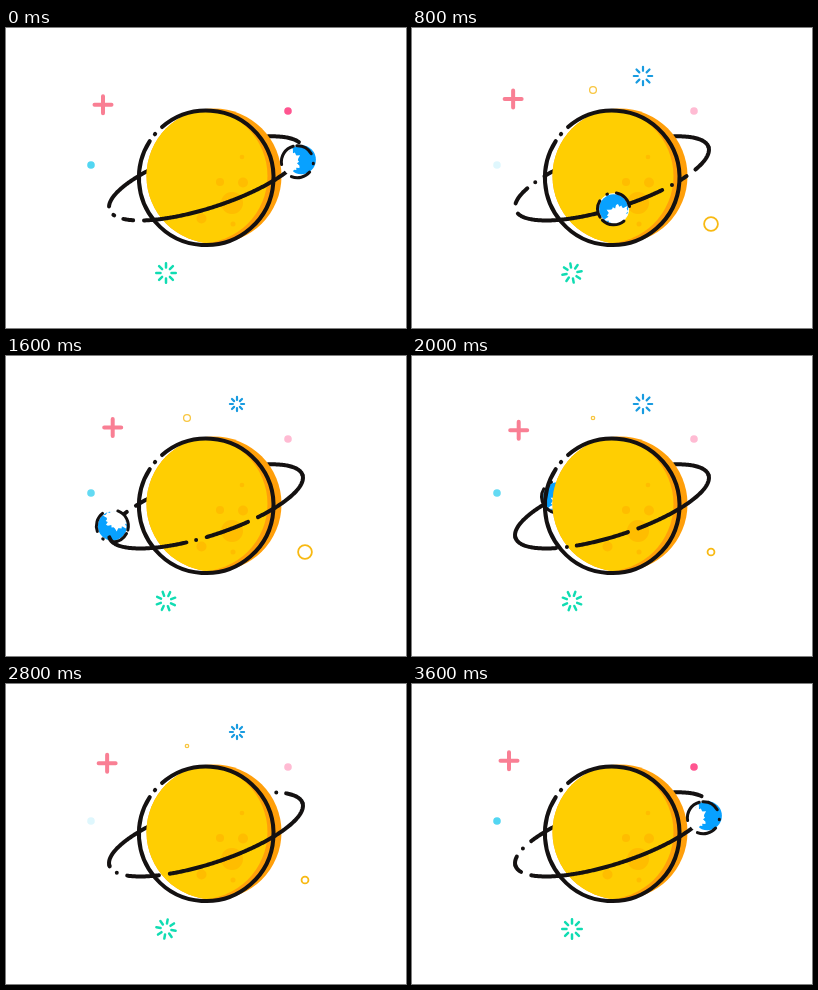
Recreate the animation shown at these times as an HTML page with a canvas. Size 400 px wide and 300 px high, loop 3700 ms.

```html
<!DOCTYPE html>
<html lang="en">
<head>
<meta charset="utf-8">
<title>Planet and moon</title>
<style>
html, body { margin: 0; width: 100%; height: 100%; overflow: hidden; background: #fff; }
canvas { display: block; }
</style>
</head>
<body>
<canvas id="stage" width="400" height="300"></canvas>
<script>
const c = document.getElementById('stage').getContext('2d');
const INK = '#141111', BLUE = '#08a1ff', TAU = Math.PI * 2, DEG = Math.PI / 180;
const LOOP = 3700, STEP = 100, STEPS = 36;
const { sin, cos, hypot } = Math;
c.lineCap = c.lineJoin = 'round';

// Tilted orbit, sampled at every pixel of its length from the right tip, front half first.
const track = [];
const A = 101.5, B = 29.5, TILT = 18 * DEG;
for (let a = 0; a < TAU; a += 1 / hypot(A * sin(a), B * cos(a))) {
  const u = A * cos(a), v = B * sin(a);
  track.push([200 + u * cos(TILT) + v * sin(TILT), 150.4 - u * sin(TILT) + v * cos(TILT)]);
}
const LEN = track.length, HALF = Math.round(LEN / 2);
const wrap = s => (s % LEN + LEN) % LEN;

// A wave over one loop, from 1 at its ends to -1 in the middle.
const wave = (t, period = STEPS) => cos(TAU * t / period);

function disc(x, y, r, color) {
  c.fillStyle = color;
  c.beginPath();
  c.arc(x, y, r, 0, TAU);
  c.fill();
}

function arc(x, y, r, from, to, color, width) {
  c.strokeStyle = color;
  c.lineWidth = width;
  c.beginPath();
  c.arc(x, y, r, from, to);
  c.stroke();
}

function burst(x, y, r, turn, color, width) {
  c.strokeStyle = color;
  c.lineWidth = width;
  c.beginPath();
  for (let i = 0; i < 8; i++) {
    const a = turn + i * TAU / 8, dx = cos(a), dy = sin(a);
    c.moveTo(x + dx * r * 0.5, y + dy * r * 0.5);
    c.lineTo(x + dx * (r - width / 2), y + dy * (r - width / 2));
  }
  c.stroke();
}

// Two dots and two gaps chase each other round the ring at easing speeds.
function ring(from, to, t) {
  const q = (t - 4) / 32;
  const dot = 32 + 212 * (q + 0.06 - 0.08 * cos(TAU * (q - 0.07)));
  const gap = 14 + 190 * (q - 0.02 + 0.065 * cos(TAU * (q - 0.85)));
  c.strokeStyle = INK;
  c.lineWidth = 4;
  c.beginPath();
  let down = false;
  for (let s = from; s <= to; s += 1) {
    const away = p => Math.abs(wrap(s - p + LEN / 2) - LEN / 2);
    const toDot = Math.min(away(dot), away(dot + 202));
    const toGap = Math.min(away(gap), away(gap + 190));
    const on = toDot <= 0.6 || (toDot > 10 && toGap > 5);
    if (on) {
      const p = track[s % LEN];
      if (!down) c.moveTo(...p);
      c.lineTo(...p);
    }
    down = on;
  }
  c.stroke();
}

function moonPlace(t) {
  const p = t / STEPS;
  return Math.round(wrap(15.5 + LEN * (p + 0.05 * sin(Math.PI * p) ** 4))) % LEN;
}

function moon(t) {
  const [x, y] = track[moonPlace(t)];
  const turn = Math.PI + 30 * DEG * t;
  const shift = 4 * cos(Math.PI * t / STEPS) ** 16;
  disc(x, y, 15.5, '#fff');
  disc(x + shift, y - shift / 2, 14.5, BLUE);
  c.save();
  c.beginPath();
  c.arc(x, y, 15, 0, TAU);
  c.clip();
  c.translate(x, y);
  c.rotate(turn);
  c.fillStyle = '#fff';
  c.beginPath();
  for (let i = 0; i < 40; i++) {
    const a = i * TAU / 40, r = 9.5 * (1 + 0.15 * sin(i * 2.3) + 0.12 * cos(i * 1.1));
    c.lineTo(8 + r * cos(a), r * 1.2 * sin(a));
  }
  c.fill();
  c.restore();
  for (const [from, to] of [[40, 112], [170, 255], [268, 330], [5, 7]]) {
    arc(x, y, 16, turn + (from - 180) * DEG, turn + (to - 180) * DEG, INK, 3);
  }
}

function planet() {
  disc(208, 148, 67.5, '#ff9f0a');
  c.save();
  c.beginPath();
  c.arc(208, 148, 67.5, 0, TAU);
  c.clip();
  disc(194, 148, 67.5, '#ffce02');
  c.restore();
  const craters = [[236, 129, 2.3], [214, 154, 4], [237, 154.5, 5],
                   [226, 175, 11], [195.5, 190.5, 5], [227, 196, 2.5]];
  for (const [x, y, r] of craters) disc(x, y, r, '#ffbd00');
}

function outline() {
  arc(200.2, 149.8, 67.3, 229 * DEG, 573 * DEG, INK, 4);
  arc(200.2, 149.8, 67.3, 220.3 * DEG, 220.7 * DEG, INK, 4);
}

function plus(t) {
  const x = 102 - 5 * wave(t), y = 74.7 - 4.6 * sin(TAU * (t - 2.5) / STEPS);
  c.strokeStyle = '#f97f94';
  c.lineWidth = 4;
  c.beginPath();
  c.moveTo(x - 8.5, y);
  c.lineTo(x + 8.5, y);
  c.moveTo(x, y - 8.5);
  c.lineTo(x, y + 8.5);
  c.stroke();
}

function sparkles(t) {
  plus(t);
  c.globalAlpha = 0.6 + 0.4 * wave(t, 12);
  disc(282, 83, 3.8, '#ff5590');
  c.globalAlpha = 0.58 + 0.42 * wave(t, 18);
  disc(85, 137, 3.8, '#52d6f2');
  c.globalAlpha = 1;

  const size = 11 * sin(Math.PI * (t % 12 / 12) ** 1.2);
  if (size > 1) burst(231, 48, size, 0, '#189be0', 2.2);
  burst(160, 245, 11, -1.25 * DEG * t, '#10dcb2', 2.5);

  const pulse = (0.75 + 0.25 * wave(t, 8)) * Math.min(1, t / 4, (STEPS - t) / 4);
  if (pulse > 0) {
    arc(181, 62, 3.4 * pulse, 0, TAU, '#f8c640', 1.3);
    arc(299, 196, 6.9 * pulse, 0, TAU, '#f8b912', 1.8);
  }
}

function draw(now) {
  const t = Math.floor((now % LOOP) / STEP);
  const s = moonPlace(t), behind = s > HALF && s < LEN - 40;
  c.clearRect(0, 0, 400, 300);
  sparkles(t);
  ring(HALF, LEN, t);
  if (behind) moon(t);
  planet();
  outline();
  ring(0, HALF, t);
  if (!behind) moon(t);
}

let start;
function frame(now) {
  start ??= now;
  draw(now - start);
  requestAnimationFrame(frame);
}
draw(0);
requestAnimationFrame(frame);
</script>
</body>
</html>
```
